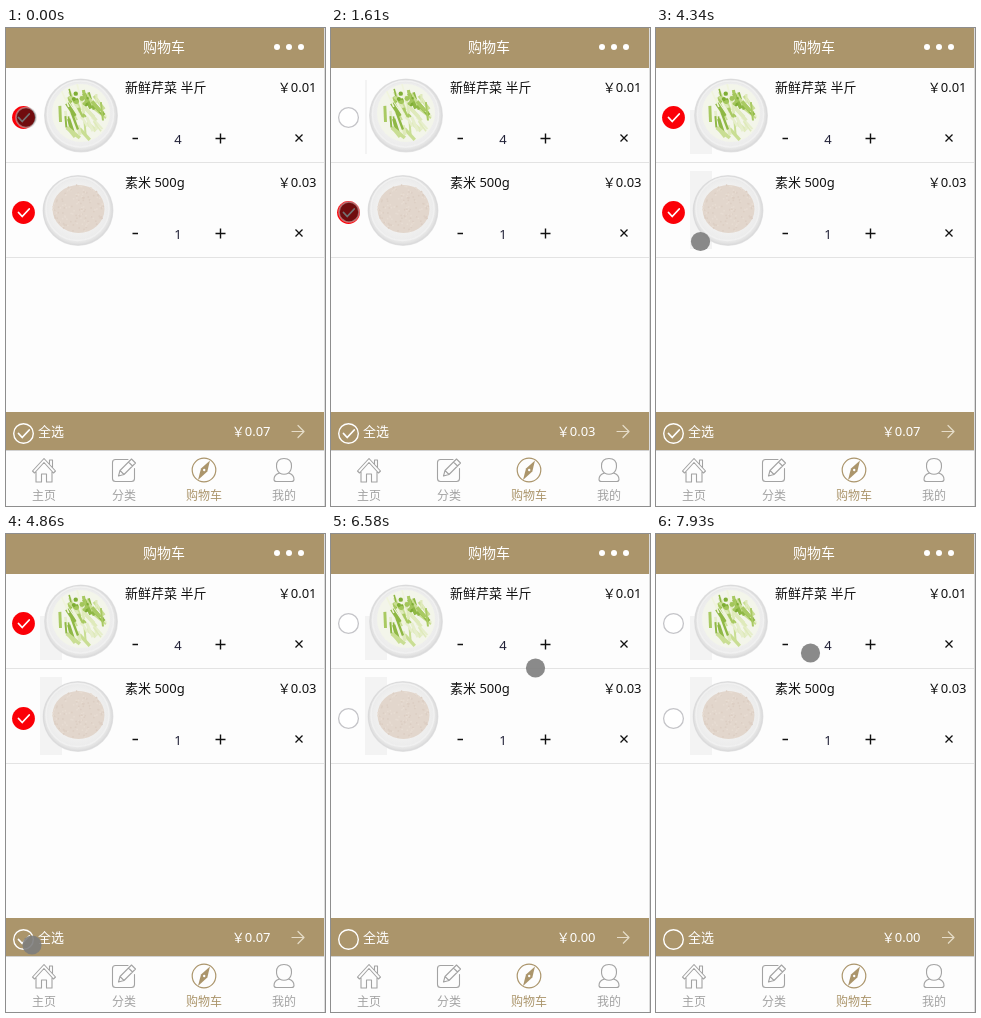
Recreate the animation shown at these times as an HTML page with a canvas. Size 319 px wide and 478 px high, loop 8000 ms.

```html
<!DOCTYPE html>
<html lang="zh-CN">
<head>
<meta charset="utf-8">
<title>购物车</title>
<style>
html, body { margin: 0; width: 100%; height: 100%; overflow: hidden; background: #fdfdfd; }
canvas { display: block; width: 319px; height: 478px; }
</style>
</head>
<body>
<canvas id="stage"></canvas>
<script>
const W = 319, H = 478, LOOP = 8000;
const GOLD = '#ab956b', GREY = '#a3a3a3', INK = '#111';
const canvas = document.getElementById('stage');
const ctx = canvas.getContext('2d');
const ratio = window.devicePixelRatio || 1;
canvas.width = W * ratio;
canvas.height = H * ratio;
ctx.scale(ratio, ratio);

// Touch pointer: time, x, y, pressed
const touches = [
  [0, 20, 89.5, 1], [1210, 24, 101, 0], [1360, 18.5, 180, 0], [1610, 18, 184, 1],
  [3440, 19.5, 161.5, 0], [3560, 21, 124, 0], [3680, 20, 98, 0], [3800, 18.5, 90.5, 1],
  [4220, 31, 122, 0], [4340, 44.5, 213.5, 0], [4470, 45, 300, 0], [4590, 40, 364, 0],
  [4710, 33, 398, 0], [4860, 26, 411, 0], [5010, 16.5, 412, 1],
  [6290, 125, 245, 0], [6430, 163, 158, 0], [6580, 204.5, 134, 0], [6700, 217.5, 118, 0],
  [6850, 218.5, 113.5, 1], [7140, 216, 112.5, 0], [7280, 188, 118, 0],
  [7410, 150, 120, 0], [7530, 130.5, 113.5, 1], [7930, 154.5, 119, 0]
];
const totals = [[0, '0.07'], [650, '0.03'], [2320, '0.00'], [3440, '0.03'], [4220, '0.07'], [5450, '0.00']];

const at = (steps, t) => steps.filter(s => s[0] <= t).pop();
const within = (t, a, b) => t >= a && t < b;

function rect(x, y, w, h, color) {
  ctx.fillStyle = color;
  ctx.fillRect(x, y, w, h);
}

function disc(x, y, r, color) {
  ctx.fillStyle = color;
  ctx.beginPath();
  ctx.arc(x, y, r, 0, Math.PI * 2);
  ctx.fill();
}

function ring(x, y, r, color, width) {
  ctx.strokeStyle = color;
  ctx.lineWidth = width;
  ctx.beginPath();
  ctx.arc(x, y, r, 0, Math.PI * 2);
  ctx.stroke();
}

function stroke(path, color, width) {
  ctx.strokeStyle = color;
  ctx.lineWidth = width;
  ctx.stroke(new Path2D(path));
}

function text(str, x, y, size, color, align = 'left') {
  ctx.font = `${size}px "Noto Sans", "Noto Sans CJK SC", "Noto Sans CJK", sans-serif`;
  ctx.textAlign = align;
  ctx.fillStyle = color;
  ctx.fillText(str, x, y);
}

function seeded(seed) {
  return () => (seed = (seed * 16807) % 2147483647) / 2147483647;
}

function plate(x, y, r) {
  const g = ctx.createRadialGradient(x - 2, y - 3, r * 0.5, x, y, r);
  g.addColorStop(0, '#f4f4f3');
  g.addColorStop(0.72, '#ececec');
  g.addColorStop(0.87, '#e2e2e2');
  g.addColorStop(0.94, '#dadadb');
  g.addColorStop(1, '#e6e6e6');
  disc(x, y, r, g);
  ring(x - 0.5, y - 1.5, r - 4, '#f1f1f1', 1.5);
}

function celery() {
  plate(75, 87.5, 37);
  disc(75, 85, 29, '#f3f5ea');
  const rnd = seeded(77);
  const tones = ['#dfeabb', '#c9de93', '#f0f4dc', '#a9ca62', '#e6eecb', '#8fb845'];
  ctx.lineCap = 'butt';
  for (let i = 0; i < 58; i++) {
    const a = rnd() * 6.28, d = Math.sqrt(rnd()) * 22;
    const x = 76 + Math.cos(a) * d, y = 85 + Math.sin(a) * d;
    const tilt = 0.65 + rnd() * 0.9, len = 4 + rnd() * 6;
    const dx = Math.cos(tilt) * len, dy = Math.sin(tilt) * len;
    stroke(`M${x - dx} ${y - dy}L${x + dx} ${y + dy}`, tones[Math.floor(rnd() * 6)], 1.5 + rnd() * 2.5);
  }
  for (let i = 0; i < 12; i++) {
    disc(57 + rnd() * 25, 65 + rnd() * 12, 1 + rnd() * 1.8, i % 2 ? '#7fae35' : '#a3c65c');
  }
}

function rice() {
  plate(72, 182.5, 35.5);
  ctx.fillStyle = '#e2d6cc';
  ctx.beginPath();
  ctx.ellipse(72.5, 181, 26, 24, 0, 0, Math.PI * 2);
  ctx.fill();
  const rnd = seeded(19);
  for (let i = 0; i < 150; i++) {
    const a = rnd() * 6.28, d = Math.sqrt(rnd());
    disc(72.5 + Math.cos(a) * d * 26, 181 + Math.sin(a) * d * 24, 0.9, i % 2 ? '#dccec3' : '#e7dcd2');
  }
}

function tick(x, y, color) {
  ctx.lineCap = ctx.lineJoin = 'round';
  stroke(`M${x - 5} ${y}l3.7 4l7 -7.5`, color, 1.8);
}

function checkbox(y, on) {
  const x = 17.5;
  if (on) {
    disc(x, y, 11.4, '#fb0007');
    tick(x, y, '#fff');
  } else {
    disc(x, y, 10, '#fff');
    ring(x, y, 9.9, '#c4c4c8', 1.3);
  }
}

function row(y, name, price, count, on) {
  text(name, 119, y + 24, 13, INK);
  text('￥' + price, 310.5, y + 24, 13, INK, 'right');
  text(count, 172, y + 75.5, 13, '#222238', 'center');
  ctx.lineCap = 'butt';
  stroke(`M126.5 ${y + 70.5}h5.5M209.5 ${y + 70.5}h10m-5 -5v10`, INK, 1.4);
  stroke(`M289.5 ${y + 66.5}l7 7m0 -7l-7 7`, INK, 1.3);
  checkbox(y + 49.5, on);
  rect(0, y + 94, 318, 1, '#e3e3e3');
}

function tabs() {
  rect(0, 422, 318, 1, '#d2d2d2');
  ctx.lineCap = ctx.lineJoin = 'round';
  stroke('M26.5 443L38 430.5L49.5 443L47.5 445L38 434.5L28.5 445ZM30 444v10h5.5v-8h5v8h5.5v-10M43.5 436v-4h3v7.5', GREY, 1.1);
  stroke('M122 431.5h-12.5q-3 0 -3 3v16q0 3 3 3h16q3 0 3 -3v-10', GREY, 1.1);
  stroke('M112.5 448l1.5 -5.5l11.5 -11.5l4 4l-11.5 11.5zM114 442.5l4 4M122.5 434l4 4', GREY, 1.1);
  ring(198, 442, 11.8, GOLD, 1.2);
  ctx.fillStyle = GOLD;
  ctx.fill(new Path2D('M204 432.5L201.3 443.5L192 452L195 440.5Z'));
  disc(198.2, 442, 1.2, '#fdfdfd');
  stroke('M273.5 445q-3 -2.5 -3 -7q0 -7.5 7.5 -7.5q7.5 0 7.5 7.5q0 4.500 -3 7q5.500 1.500 5.500 6.500q0 2 -2.500 2h-15q-2.500 0 -2.500 -2q0 -5 5.500 -6.500q4.500 2.500 9 0', GREY, 1.1);
  ['主页', '分类', '购物车', '我的'].forEach((label, i) =>
    text(label, 38 + i * 80, 472, 12, i === 2 ? GOLD : GREY, 'center'));
}

// Light patches left behind the product pictures
function patches(t) {
  const c = '#f3f3f3';
  if (within(t, 650, 4340)) rect(34, 52, 2, 74, c);
  if (within(t, 3440, 4340)) rect(34, 152, 78, 69, c);
  if (t >= 4340) {
    rect(34, 82, 22, 44, c);
    rect(34, 143, 22, 78, c);
  }
}

function pointer(t) {
  const [, x, y, down] = at(touches, t);
  if (down) {
    disc(x, y, 10, 'rgba(20,20,20,.6)');
    ring(x, y, 10, 'rgba(190,190,190,.55)', 1.6);
  } else {
    disc(x, y, 9.6, 'rgba(125,125,125,.9)');
  }
}

function draw(t) {
  rect(0, 0, W, H, '#fdfdfd');
  rect(0, 0, 318, 40, GOLD);
  text('购物车', 158, 24, 14, '#fff', 'center');
  [271, 283, 295].forEach(x => disc(x, 19, 3, '#fff'));

  patches(t);
  celery();
  rice();
  row(40, '新鲜芹菜 半斤', '0.01', within(t, 7140, 7780) ? '5' : '4', t < 650 || within(t, 4070, 5300));
  row(135, '素米 500g', '0.03', '1', t < 2320 || within(t, 3440, 5300));

  rect(0, 384, 318, 38, GOLD);
  ring(17.5, 405.5, 9.8, '#fff', 1.4);
  if (t < 5300) tick(17.5, 405.5, '#fff');
  text('全选', 32, 408, 13, '#fff');
  text('￥' + at(totals, t)[1], 264.5, 408, 13, '#fff', 'right');
  stroke('M286 403.5h12m-6 -6l6 6l-6 6', '#e6dcc8', 1.2);

  tabs();
  rect(318, 0, 1, H, '#dcdcdc');
  pointer(t);
}

const start = performance.now();
function loop() {
  draw((performance.now() - start) % LOOP);
  requestAnimationFrame(loop);
}
loop();
</script>
</body>
</html>
```
